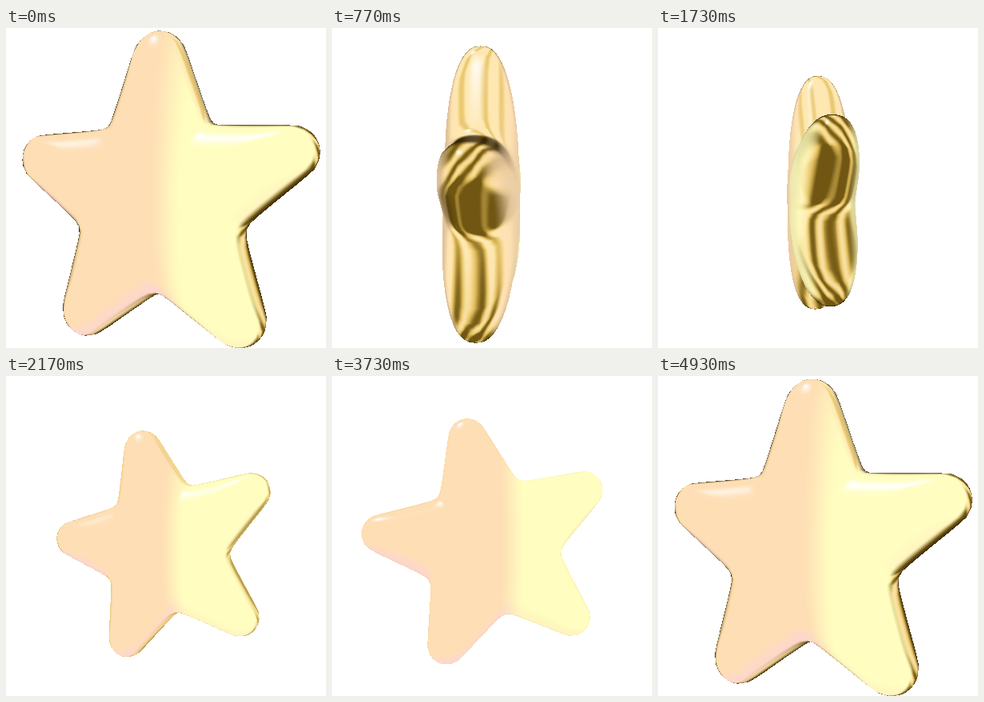
Animation, 400 px wide and 400 px high, one loop 4960 ms. Source, as an HTML page with a canvas:

```html
<!DOCTYPE html>
<html lang="en">
<head>
<meta charset="utf-8">
<title>Glossy star</title>
<style>
html, body { margin: 0; width: 100%; height: 100%; overflow: hidden; background: #fff; }
canvas { display: block; width: 400px; height: 400px; }
</style>
</head>
<body>
<canvas id="stage" width="400" height="400"></canvas>
<script>
const SIZE = 400, LOOP = 4960, STEPS = 150, CAMERA = 5, RAD = Math.PI / 180;
const ctx = document.getElementById('stage').getContext('2d');
const image = ctx.createImageData(SIZE, SIZE);

// time, yaw, roll, radius, centre x, centre y
const KEYS = [
  [0, 26, 0, 211, 193, 215],
  [770, -86, -7, 186, 188, 212],
  [1300, -194, -9, 172, 207, 213],
  [2170, -342, -13, 150, 198, 214],
  [2700, -370, -17, 142, 201, 211],
  [3070, -380, -18, 141, 202, 209],
  [3730, -363, -12, 161, 198, 211],
  [4960, -334, 0, 211, 193, 215]
];
const LAST = KEYS.length - 1;

function slopeAt(i, k) {
  const rate = j => (KEYS[j + 1][k] - KEYS[j][k]) / (KEYS[j + 1][0] - KEYS[j][0]);
  const a = rate(i === 0 ? LAST - 1 : i - 1), b = rate(i === LAST ? 0 : i);
  return a * b > 0 ? 2 * a * b / (a + b) : 0;
}

// Monotone cubic through the keys
function pose(t) {
  let i = 0;
  while (i < LAST - 1 && t >= KEYS[i + 1][0]) i++;
  const a = KEYS[i], b = KEYS[i + 1], d = b[0] - a[0], u = (t - a[0]) / d;
  const u2 = u * u, u3 = u2 * u, e = 3 * u2 - 2 * u3;
  return [1, 2, 3, 4, 5].map(k => a[k] + (b[k] - a[k]) * e
    + d * ((u3 - 2 * u2 + u) * slopeAt(i, k) + (u3 - u2) * slopeAt(i + 1, k)));
}

// Outline of one half arm: round tip, then a straight side to the valley
const TIP = 0.15, TIP_X = 1 - TIP, INNER = 0.53, HALF = 36 * RAD;
const valley = [INNER * Math.cos(HALF), INNER * Math.sin(HALF)];
const toValley = [valley[0] - TIP_X, valley[1]];
const sideAngle = Math.atan2(toValley[1], toValley[0]) - Math.acos(TIP / Math.hypot(...toValley));
const sideDist = valley[0] * Math.cos(sideAngle) + valley[1] * Math.sin(sideAngle);
const joint = Math.atan2(TIP * Math.sin(sideAngle), TIP_X + TIP * Math.cos(sideAngle));

function outline(delta) {
  const d = Math.abs(delta);
  if (d < joint) return TIP_X * Math.cos(d) + Math.sqrt(TIP * TIP - (TIP_X * Math.sin(d)) ** 2);
  const soft = HALF - Math.hypot(HALF - d, 3.5 * RAD * (d - joint) / (HALF - joint));
  return sideDist / Math.cos(soft - sideAngle);
}

// Puffy star mesh: rings from the front pole to the back pole
const PER_ARM = 24, AROUND = PER_ARM * 5, RINGS = 30, DEPTH = 0.25, POW = 0.83;
const points = [], normals = [];
for (let j = 0; j <= RINGS; j++) {
  const psi = Math.PI * j / RINGS, cos = Math.cos(psi);
  const rho = Math.pow(Math.max(0, Math.sin(psi)), POW);
  const z = DEPTH * Math.sign(cos) * Math.pow(Math.abs(cos), POW);
  for (let i = 0; i < AROUND; i++) {
    const s = (i % PER_ARM) / PER_ARM * 2 - 1;
    const delta = HALF * Math.sign(s) * Math.pow(Math.abs(s), 1.4);
    const phi = Math.floor(i / PER_ARM) * 72 * RAD + delta, r = rho * outline(delta);
    points.push([r * Math.sin(phi), -r * Math.cos(phi), z]);
  }
}
const at = (j, i) => j * AROUND + (i + AROUND) % AROUND;
for (let j = 0; j <= RINGS; j++) {
  for (let i = 0; i < AROUND; i++) {
    if (j === 0 || j === RINGS) { normals.push([0, 0, j ? -1 : 1]); continue; }
    const p = points[at(j, i + 1)], q = points[at(j, i - 1)];
    const a = points[at(j + 1, i)], b = points[at(j - 1, i)];
    const u = p.map((v, k) => v - q[k]), w = a.map((v, k) => v - b[k]);
    const n = [u[1] * w[2] - u[2] * w[1], u[2] * w[0] - u[0] * w[2], u[0] * w[1] - u[1] * w[0]];
    const o = points[at(j, i)];
    const sign = n[0] * o[0] + n[1] * o[1] + n[2] * o[2] < 0 ? -1 : 1;
    const len = sign * (Math.hypot(...n) || 1);
    normals.push(n.map(v => v / len));
  }
}

const FIELDS = 7; // x, y, nearness, normal x y z, body x
const verts = new Float32Array(points.length * FIELDS);
const near = new Float32Array(SIZE * SIZE);
const surf = new Float32Array(SIZE * SIZE * 4);

function project([yaw, roll, radius, cx, cy]) {
  const c = Math.cos(yaw * RAD), s = Math.sin(yaw * RAD);
  const rc = Math.cos(roll * RAD), rs = Math.sin(roll * RAD);
  points.forEach((p, k) => {
    const n = normals[k], o = k * FIELDS;
    const x = p[0] * rc - p[1] * rs, y = p[0] * rs + p[1] * rc;
    const scale = CAMERA / (CAMERA - (x * s + p[2] * c));
    verts[o] = cx + radius * scale * (x * c - p[2] * s);
    verts[o + 1] = cy + radius * scale * y;
    verts[o + 2] = scale;
    verts[o + 3] = n[0] * rc - n[1] * rs;
    verts[o + 4] = n[0] * rs + n[1] * rc;
    verts[o + 5] = n[2];
    verts[o + 6] = x;
  });
}

function triangle(a, b, c) {
  a *= FIELDS; b *= FIELDS; c *= FIELDS;
  const v = verts, ax = v[a], ay = v[a + 1], bx = v[b], by = v[b + 1], cx = v[c], cy = v[c + 1];
  const area = (bx - ax) * (cy - ay) - (by - ay) * (cx - ax);
  if (Math.abs(area) < 1e-6) return;
  const x0 = Math.max(0, Math.ceil(Math.min(ax, bx, cx) - 0.5));
  const x1 = Math.min(SIZE - 1, Math.floor(Math.max(ax, bx, cx) - 0.5));
  const y0 = Math.max(0, Math.ceil(Math.min(ay, by, cy) - 0.5));
  const y1 = Math.min(SIZE - 1, Math.floor(Math.max(ay, by, cy) - 0.5));
  for (let y = y0; y <= y1; y++) {
    for (let x = x0; x <= x1; x++) {
      const px = x + 0.5, py = y + 0.5;
      const wa = ((bx - px) * (cy - py) - (by - py) * (cx - px)) / area;
      const wb = ((cx - px) * (ay - py) - (cy - py) * (ax - px)) / area;
      const wc = 1 - wa - wb;
      if (wa < -1e-4 || wb < -1e-4 || wc < -1e-4) continue;
      const k = y * SIZE + x, z = wa * v[a + 2] + wb * v[b + 2] + wc * v[c + 2];
      if (z <= near[k]) continue;
      near[k] = z;
      for (let f = 0; f < 4; f++) {
        surf[k * 4 + f] = wa * v[a + 3 + f] + wb * v[b + 3 + f] + wc * v[c + 3 + f];
      }
    }
  }
}

const PEACH = [254, 222, 180], YELLOW = [255, 254, 192], PINK = [253, 215, 205];
const CREAM = [255, 240, 190], OLIVE = [112, 86, 18], GOLD = [226, 190, 92];
const PALE = [254, 231, 176], BLACK = [32, 20, 0], WHITE = [255, 255, 255];

const step = (a, b, x) => {
  const t = Math.min(1, Math.max(0, (x - a) / (b - a)));
  return t * t * (3 - 2 * t);
};
const col = [0, 0, 0], metal = [0, 0, 0];
const set = (out, c) => { out[0] = c[0]; out[1] = c[1]; out[2] = c[2]; };
const blend = (out, c, m) => { for (let i = 0; i < 3; i++) out[i] += (c[i] - out[i]) * m; };

function shade(nx, ny, nz, px, c, s) {
  const len = Math.hypot(nx, ny, nz) || 1;
  nx /= len; ny /= len; nz /= len;
  const vx = nx * c - nz * s, vz = nx * s + nz * c, turn = Math.abs(s);
  const right = step(0.04, 0.26, px), edgeOn = step(0.5, 1, turn);

  set(col, PEACH);
  blend(col, YELLOW, right);
  const under = step(0.4, 0.75, ny);
  blend(col, PINK, under * (1 - right) * 0.9);
  blend(col, CREAM, under * right * 0.6);

  // Golden side walls and grazing rims; seen edge-on, all of the body turns gold
  const wall = 1 - step(0.1 + 0.5 * edgeOn, 0.5 + 0.6 * edgeOn, Math.abs(nz));
  const rim = (1 - step(0.15, 0.58, vz)) * step(0.3, 0.8, Math.abs(nx));
  const gild = Math.max(wall, rim) * Math.min(1, turn * 2.4);
  if (gild > 0.01) {
    const tone = 0.9 - 0.48 * step(0.4, 0.55, Math.abs(px)) - 0.5 * step(0.25, 0.7, ny)
      + 0.34 * Math.sin(9 * ny + 10 * nz + 4 * px);
    set(metal, OLIVE);
    blend(metal, GOLD, step(0, 0.55, tone));
    blend(metal, PALE, step(0.4, 0.9, tone));
    const deep = step(0.32, 0.44, turn);
    blend(metal, BLACK, (1 - step(0.1, 0.5, vz)) * deep * 0.8);
    blend(metal, GOLD, (1 - deep) * 0.5);
    blend(col, metal, gild);
  }

  const gloss = Math.max(0, -0.3 * vx - 0.58 * ny + 0.757 * vz);
  blend(col, WHITE, Math.pow(gloss, 140));
  const glint = Math.max(0, -0.14 * vx - 0.25 * ny + 0.958 * vz);
  blend(col, WHITE, edgeOn * (1 - step(0.2, 0.4, Math.abs(px))) * Math.pow(glint, 90));
}

function draw(t) {
  const state = pose(t), c = Math.cos(state[0] * RAD), s = Math.sin(state[0] * RAD);
  near.fill(0);
  project(state);
  for (let j = 0; j < RINGS; j++) {
    for (let i = 0; i < AROUND; i++) {
      const a = at(j, i), b = at(j, i + 1), d = at(j + 1, i), e = at(j + 1, i + 1);
      triangle(a, b, e);
      triangle(a, e, d);
    }
  }
  const out = image.data.fill(255);
  for (let k = 0; k < near.length; k++) {
    if (!near[k]) continue;
    const o = k * 4;
    shade(surf[o], surf[o + 1], surf[o + 2], surf[o + 3], c, s);
    out[o] = col[0];
    out[o + 1] = col[1];
    out[o + 2] = col[2];
  }
  ctx.putImageData(image, 0, 0);
}

let shown = -1;
function tick() {
  const n = Math.floor(performance.now() % LOOP / LOOP * STEPS + 0.01) % STEPS;
  if (n !== shown) draw(n * LOOP / STEPS);
  shown = n;
  requestAnimationFrame(tick);
}
tick();
</script>
</body>
</html>
```
